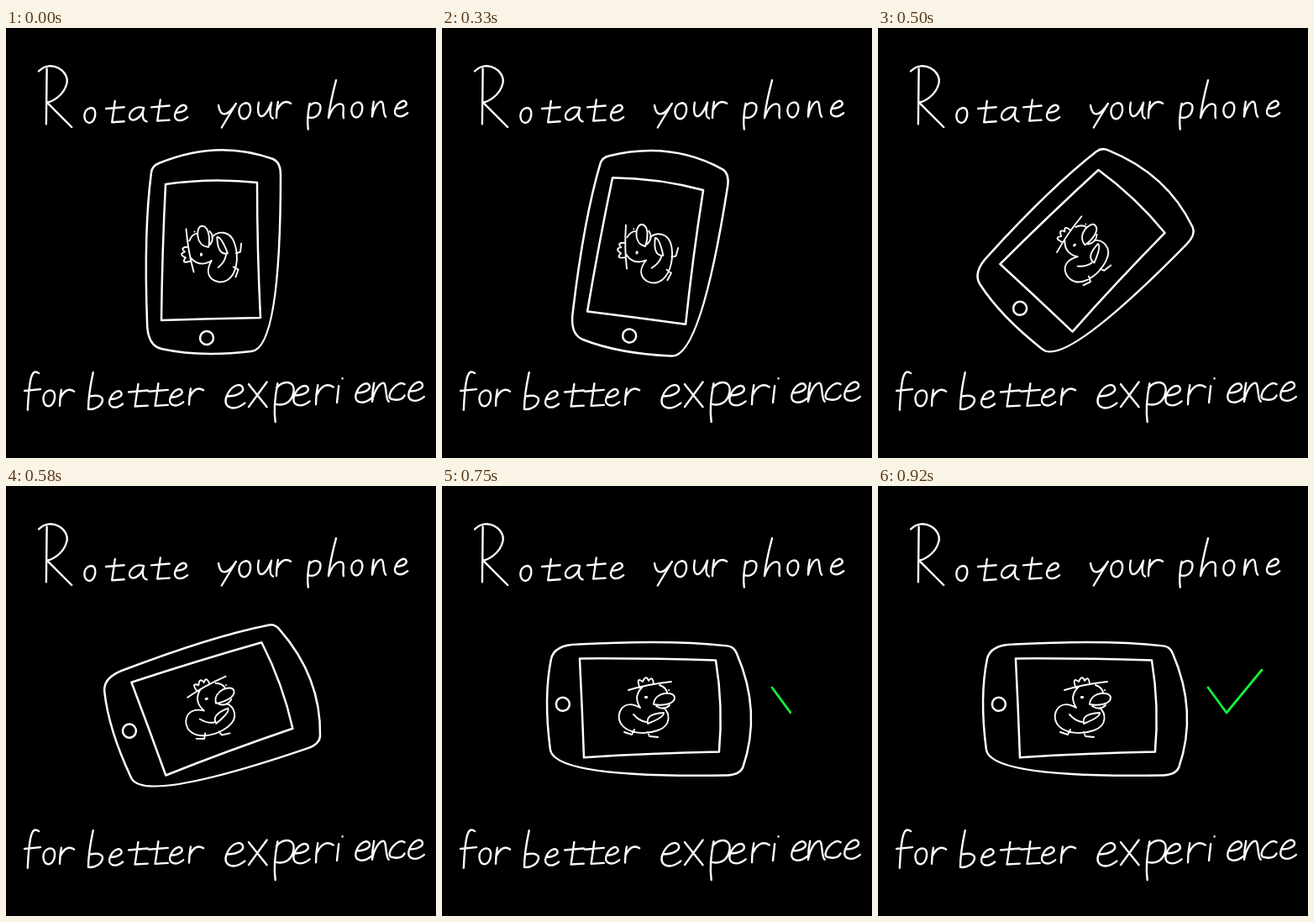
Write an HTML page with a canvas that moves like this. It is 512 px wide and 512 px high and loops after 1.83 s.

```html
<!DOCTYPE html>
<html lang="en">
<head>
<meta charset="utf-8">
<title>Rotate your phone for better experience</title>
<style>
  html, body { margin: 0; height: 100%; overflow: hidden; background: #000; }
  canvas { display: block; width: 100%; height: 100%; }
</style>
</head>
<body>
<canvas id="stage" width="512" height="512" role="img" aria-label="Rotate your phone for better experience"></canvas>
<script>
const ctx = document.getElementById("stage").getContext("2d");
const LOOP = 1830, TURN_START = 330, FULL_TURN = 89, TICK_LENGTH = 104, TILT = 0.03;
const CENTER = { x: 247, y: 266 };

// Handwriting: baseline at 0, small letters 10 units high.
const glyphs = {
  R: "M0-9C2-11 5-9 4.5-7S2-4 1.3-4L5.3 0M1.3-9.4L1.2-.5",
  a: "M10-9C4-11-1-5 1-2S9-3 10-9Q8-1 12 0",
  b: "M3-22Q0-8 0 1C9 2 14-10 1-7",
  c: "M8-9C4-12-3-2 1-1S7-1 8-3",
  e: "M1-5C6-5 9-7 8-9S3-10 1-5S4 2 9-2",
  f: "M9-21C5-24 3-20 2 2M0-10L10-11",
  h: "M5-25Q1-10 0 0C3-9 7-10 9-9S9-3 10 0",
  i: "M1-9L0 0M3-13v-.1",
  n: "M1-10Q0-5 0 0C1-6 4-10 6-10S7-1 9 0",
  o: "M5-10C-1-9 0 0 4 0S10-10 5-10",
  p: "M2-10Q0 0 1 7M1.5-8C5-12 10-11 9-6S4 0 1-1",
  r: "M1-10Q0-5 0 0M.5-5C3-10 6-11 9-9",
  t: "M6-14L4 0L12-.5M0-9L12-10",
  u: "M1-10C-1 0 4 3 9-10Q7-1 10 0",
  x: "M0-10L8 0M8-11L0 0",
  y: "M0-9C1-1 6-2 11-10L2 5"
};

const lettering = new Path2D();

function write(text, x, baseline, size, pitch) {
  [...text].forEach((char, i) => {
    const scale = size / 10, dx = i * pitch;
    lettering.addPath(new Path2D(glyphs[char]),
      new DOMMatrix([scale, 0, 0, scale, x + dx, baseline - dx * TILT]));
  });
}

write("R", 39, 118, 74, 0);
write("otate", 92, 113, 18, 27);
write("your", 253, 109, 19, 23);
write("phone", 358, 108, 18, 26);
write("for", 22, 451, 19, 21);
write("better", 98, 452, 19, 24);
write("exp", 260, 452, 27, 29);
write("er", 341, 449, 23, 28);
write("ience", 394, 446, 22, 21);

// The phone is drawn upright, the duck as it sits once the phone lies on its side.
const phone = new Path2D(
  "M173 172Q174 164 182 161Q252 132 318 156Q327 160 327 175C327 260 323 383 292 385" +
  "Q230 392 185 382Q168 378 168 350Q164 240 173 172Z" +
  "M190 186Q245 178 299 184Q299 265 303 345Q245 346 185 348Q186 265 190 186Z");
phone.moveTo(247, 369);
phone.arc(239, 369, 8, 0, 7);

const duck = new Path2D([
  "M222 243Q245 236 273 233",                                        // brim
  "M235 239Q231 227 239 233Q243 224 246 232Q251 225 252 236",        // crown
  "M239 239Q227 250 236 264M259 237Q267 240 268 246M270 243h.1",     // head
  "M242 251h2v1h-2z",                                                // eye
  "M252 260C253 244 277 244 277 252S262 262 252 260",                // beak
  "M255 262Q264 268 271 261",
  "M236 264C215 252 206 272 213 283S240 297 257 291S271 270 264 264", // body
  "M228 272Q235 280 243 281M245 283Q242 271 264 270Q265 275 245 283", // wings
  "M229 290L226 296L217 293M245 293L247 298L257 299"                 // feet
].join(""));

const tick = new Path2D("M393 240L415 270L457 219");

const clamp = (value, low, high) => Math.min(high, Math.max(low, value));

function strokeTurned(path, degrees, width) {
  ctx.save();
  ctx.translate(CENTER.x, CENTER.y);
  ctx.rotate(degrees * Math.PI / 180);
  ctx.translate(-CENTER.x, -CENTER.y);
  ctx.lineWidth = width;
  ctx.stroke(path);
  ctx.restore();
}

function draw(now) {
  // Twelve poses a second, on a clock that ticks every 10 ms.
  const time = Math.floor(now % LOOP / 10) * 10;
  const pose = clamp(Math.floor((time - TURN_START) * 3 / 250) + 1, 0, 8);

  // Slow start and end, three times as fast through the middle.
  const turn = FULL_TURN * Math.min(1, (pose + 2 * clamp(pose - 2, 0, 2)) / 10);
  const ticked = Math.max(0, (pose - 4) / 4) ** 1.5;

  ctx.fillStyle = "#000";
  ctx.fillRect(0, 0, 512, 512);
  ctx.lineCap = ctx.lineJoin = "round";
  ctx.strokeStyle = "#fff";
  strokeTurned(lettering, 0, 2.4);
  strokeTurned(phone, turn, 2.5);
  strokeTurned(duck, turn - FULL_TURN, 1.9);

  if (ticked) {
    ctx.strokeStyle = "#14f03c";
    ctx.setLineDash([ticked * TICK_LENGTH, 200]);
    strokeTurned(tick, 0, 2.8);
    ctx.setLineDash([]);
  }
  requestAnimationFrame(draw);
}

requestAnimationFrame(draw);
</script>
</body>
</html>
```
